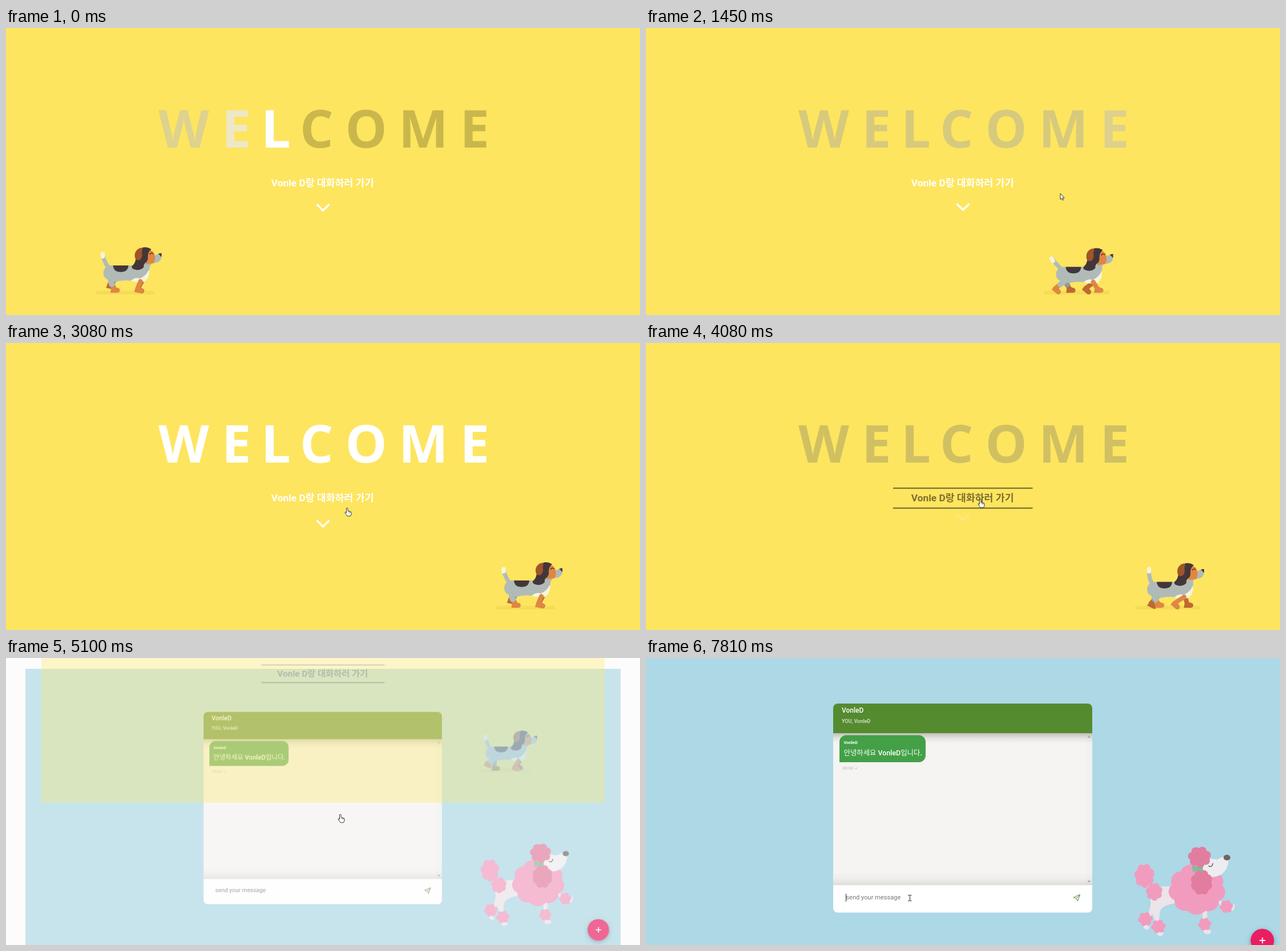
An HTML page with a canvas that plays this animation: 1111 px wide and 504 px high, repeating every 8000 ms.

```html
<!DOCTYPE html>
<html lang="ko">
<head>
<meta charset="utf-8">
<title>Welcome</title>
<style>
html, body { margin: 0; width: 100%; height: 100%; overflow: hidden; background: #fcfcfc; }
canvas { display: block; }
</style>
</head>
<body>
<canvas id="stage" width="1111" height="504"></canvas>
<script>
const LOOP = 8000, W = 1111, H = 504;
const PAD_X = 11, PAD_Y = 2, CX = 555.5, CY = 263.5;
const SANS = "Roboto, 'Noto Sans CJK KR', 'Noto Sans CJK', sans-serif";
const YELLOW = '#fde55f', DARK = [202, 183, 76], WHITE = [255, 255, 255];
const GREY = '#b0bbb8', INK = '#43363a', ORANGE = '#df8742', RUST = '#bd6a33', CREAM = '#f6f5dc';
const PINK = '#f19cbe', ROSE = '#e27d9f', FUR = '#ebe4e8';

const screen = document.getElementById('stage').getContext('2d');
const layer = () => {
  const c = document.createElement('canvas');
  c.width = W + 2 * PAD_X;
  c.height = 530;
  const k = c.getContext('2d');
  k.translate(PAD_X, PAD_Y);
  return k;
};
const front = layer(), back = layer();
let g = screen;

const clamp = (v, a = 0, b = 1) => Math.min(b, Math.max(a, v));
const ramp = (t, a, b) => clamp((t - a) / (b - a));
const mix = (a, b, k) => `rgb(${a.map((v, i) => Math.round(v + (b[i] - v) * k))})`;

// CSS "ease" curve
function ease(x) {
  if (x <= 0 || x >= 1) return clamp(x);
  const bez = (a, b, u) => 3 * a * u * (1 - u) ** 2 + 3 * b * u * u * (1 - u) + u ** 3;
  let lo = 0, hi = 1;
  for (let i = 0; i < 24; i++) {
    const m = (lo + hi) / 2;
    if (bez(0.25, 0.25, m) < x) lo = m; else hi = m;
  }
  return bez(0.1, 1, lo);
}

// linear track through [time, value...] keys
function track(keys, t) {
  let i = 1;
  while (i < keys.length - 1 && keys[i][0] < t) i++;
  const a = keys[i - 1], b = keys[i], k = ramp(t, a[0], b[0]);
  return a.slice(1).map((v, n) => v + (b[n + 1] - v) * k);
}

function shape(d, fill) {
  g.fillStyle = fill;
  g.fill(new Path2D(d));
}
function stroke(d, color, width) {
  g.strokeStyle = color;
  g.lineWidth = width;
  g.lineCap = g.lineJoin = 'round';
  g.stroke(new Path2D(d));
}
function oval(x, y, rx, ry, fill, turn = 0) {
  g.fillStyle = fill;
  g.beginPath();
  g.ellipse(x, y, rx, ry, turn, 0, 7);
  g.fill();
}
function box(x, y, w, h, r, fill) {
  g.fillStyle = fill;
  g.beginPath();
  g.roundRect(x, y, w, h, r);
  g.fill();
}
function label(s, x, y, size, weight, fill, align = 'left') {
  g.font = `${weight} ${size}px ${SANS}`;
  g.textAlign = align;
  g.fillStyle = fill;
  g.fillText(s, x, y);
}

/* ---------- welcome page ---------- */

const LETTERS = [['W', 311.5], ['E', 405.5], ['L', 475.5], ['C', 545.5], ['O', 631], ['M', 731.5], ['E', 823]];
const STEP = 240, CYCLE = 4800;

function glow(i, t) {
  const c = t > 4200 ? t - CYCLE : t;
  const age = c - (i - 2) * STEP;
  if (c > 3450) return 1 - ramp(c, 3450, 4170);
  const wave = age < 0 ? clamp(1 + age / STEP) : Math.max(0.27, 1 - age * 0.0013);
  return Math.max(wave, c > 1460 ? 0.27 + 0.73 * ramp(c, 1460, 2540) : 0);
}

function heading(t) {
  g.font = "660 92px 'Open Sans', 'Noto Sans', sans-serif";
  g.textAlign = 'left';
  LETTERS.forEach(([ch, x], i) => {
    const m = g.measureText(ch);
    const mid = (m.actualBoundingBoxRight - m.actualBoundingBoxLeft) / 2;
    g.fillStyle = mix(DARK, WHITE, glow(i, t));
    g.fillText(ch, x - mid, 209.5);
  });
}

function link(t) {
  const hover = ramp(t, 3260, 3560);
  g.fillStyle = `rgba(0,0,0,${0.5 * hover})`;
  g.fillRect(433, 253.8, 244.5, 2.3);
  g.fillRect(433, 288.8, 244.5, 2.3);
  label('Vonle D랑 대화하러 가기', 554.7, 278, 17.3, 700, mix(WHITE, [126, 110, 47], hover), 'center');

  const ph = (t + 750) % 1500 - 750;
  const y = 315 + (ph + 25) * 0.022;
  g.globalAlpha = clamp(1.4 - Math.abs(ph - 60) / 400);
  stroke(`M545.5 ${y - 5}L555.5 ${y + 5}L565.5 ${y - 5}`, '#fff', 3.4);
  g.globalAlpha = 1;
}

// a trailing foot tips onto its toe
function leg(hx, hy, fx, lift, color, upper) {
  const fy = 460 - lift, tip = 0.7 * clamp((hx - fx) / 12);
  const ax = fx - 2, ay = fy - 3;
  stroke(`M${hx} ${hy}L${ax} ${ay}`, color, 8);
  if (upper) stroke(`M${hx} ${hy}L${hx + (ax - hx) * 0.4} ${hy + (ay - hy) * 0.4}`, upper, 10);
  g.save();
  g.translate(fx, fy);
  g.rotate(tip);
  shape('M-7.500 5L-6 -4Q0 -6 4 -4Q9 -3.500 9 0.500Q9 5 4 5Z', color);
  g.restore();
}

// drawn with the nose at x = 272
function hound(t) {
  const x = 980 - 708 * Math.max(0, 1 - t / 3925) ** 3.23;
  const [turn] = track([[0, 0], [1450, 2.25], [3080, 5], [4080, 6.75], [8000, 13.6]], t);
  const s = Math.sin(turn * 2 * Math.PI), c = Math.cos(turn * 2 * Math.PI), drop = s * s;
  g.save();
  g.translate(x - 272, 0);
  box(156 - 7 * drop, 461.5, 103 + 12 * drop, 6.5, 3, '#f4dc59');

  leg(187, 446, 187 + 8 * s - 4 * c, Math.max(0, c) * 7, RUST, '#8f9b98');
  leg(237, 446, 233 - 9 * s, Math.max(0, -c) * 2, RUST);

  g.save();
  g.translate(0, 2.5 * drop);
  const tx = 169 - 4.5 * s, ty = 399 + 8 * Math.max(0, s) - 2.5 * drop;
  stroke(`M183 424Q173 416 ${tx} ${ty}`, GREY, 7);
  stroke(`M${tx} ${ty + 2}L${tx - 2.5 * Math.max(0, s)} ${ty - 2}`, CREAM, 7.5);
  shape('M184 417H226L250 411Q253 430 245 442Q238 448 228 445Q211 442 199 444Q189 447 180 443Q170 439 170 431Q170 418 184 417Z', GREY);
  shape('M218 444Q226 437 234 440Q247 434 250 423Q253 436 243 445Q232 448 218 444Z', CREAM);
  shape('M187 417H214Q213 428.500 200.500 428.500Q188 428.500 187 417Z', INK);
  g.restore();

  leg(183, 445 + drop, 181 - 10 * s + 9 * c, Math.max(0, -c) * 7, ORANGE, GREY);
  leg(235, 445 + drop, 232 + 12 * s, 0, ORANGE);

  g.translate(-2 * drop, 1.5 * drop);
  shape('M246 411L262 409L255 414Q251 417 250 426L238 424Z', GREY);
  shape('M258 400Q264 398 270 395L272 402Q271 409 265 411.500L252 414Z', GREY);
  shape('M248 389Q258 390 260 399Q262 407 258 413L244 415Z', ORANGE);
  shape('M231 390Q242 381 254 388.500Q248 393 248 401Q249 409 243 413Q240 416 241 420Q234 427 225 424Q219 423 220 418Q226 414 227 404Z', INK);
  shape('M227 392Q232 385 239 386Q237 393 238 400Q237 407 231 408Q225 407 225 400Q225 395 227 392Z', '#a05528');
  shape('M266 397Q268 395 272 395.500L272 402Q270 401 268 398Z', INK);
  stroke('M251.500 397.500Q254 393.500 257 396.500', '#6b2f1c', 1.5);
  g.restore();
}

function welcome(t) {
  g = front;
  g.clearRect(-PAD_X, -PAD_Y, W + 2 * PAD_X, 530);
  g.fillStyle = YELLOW;
  g.fillRect(-3, -PAD_Y, W + 6, 530);
  heading(t);
  link(t);
  hound(t);
}

/* ---------- chat page ---------- */

function fluff(x, y, rx, ry, n, color) {
  oval(x, y, rx * 0.75, ry * 0.75, color);
  for (let i = 0; i < n; i++) {
    const a = i / n * 2 * Math.PI - 1.2;
    oval(x + Math.cos(a) * rx * 0.63, y + Math.sin(a) * ry * 0.63, rx * 0.39, ry * 0.39, color);
  }
}

function poodle() {
  stroke('M889 408Q880 398 876 388', FUR, 5);
  shape('M884 409Q900 398 925 402L938 430Q910 431 902 442Q898 452 900 474L893 474Q892 458 887 450Q882 458 879 464L872 460Q886 444 884 425Z', FUR);
  stroke('M873 462L875 473', FUR, 6);
  oval(878, 473.5, 4, 3.5, FUR);
  oval(901, 484, 6, 4, FUR);
  stroke('M979 440L980 478', FUR, 8);
  oval(984, 481, 6.5, 4, FUR);
  stroke('M998 424L1018 437L1028 436', FUR, 6);
  oval(1028.5, 438, 3, 6, FUR, 0.3);
  fluff(873.5, 382.5, 17.5, 21, 7, PINK);
  fluff(890.5, 410.5, 14.5, 15.5, 7, PINK);
  fluff(875, 458.5, 12.5, 12.5, 6, PINK);
  fluff(898, 471.5, 12.5, 12, 6, PINK);
  fluff(979, 467.5, 11.5, 11.5, 6, PINK);
  fluff(1017, 436.5, 11.5, 11.5, 6, PINK);
  fluff(965.5, 406, 49, 44, 9, PINK);
  oval(965, 406, 38, 36, PINK);
  shape('M974 358Q986 350 1000 354L1017 347L1021 354Q1020 372 1008 380Q996 387 984 383Q975 378 973 368Z', '#eeecef');
  oval(1018, 350.5, 6, 5, '#71665e');
  stroke('M986 365Q991 369 993.500 361', '#71665e', 1.6);
  fluff(973.5, 394, 19, 22, 8, ROSE);
  shape('M957 364L966 367L976 364V375L966 373L958 376Z', '#7bbf95');
  fluff(970, 349.5, 20, 18.5, 7, ROSE);
}

function shade(y0, y1, alpha) {
  const f = g.createLinearGradient(0, y0, 0, y1);
  f.addColorStop(0, `rgba(60,50,45,${alpha})`);
  f.addColorStop(0.5, `rgba(60,50,45,${alpha * 0.3})`);
  f.addColorStop(1, 'rgba(60,50,45,0)');
  g.fillStyle = f;
  g.fillRect(328, Math.min(y0, y1), 454, Math.abs(y1 - y0));
}

function card(t) {
  box(328, 80, 454, 367, 8, '#f5f4f2');
  g.fillStyle = '#f1f1f1';
  g.fillRect(771, 132, 11, 267);
  shade(132, 150, 0.28);
  shade(399, 377, 0.12);
  shape('M774 140L776.500 136.500L779 140Z', '#a3a3a3');
  shape('M774 391L776.500 394.500L779 391Z', '#a3a3a3');
  box(328, 80, 454, 52, [8, 8, 0, 0], '#558b2f');
  label('VonleD', 343, 96, 12, 500, '#fff');
  label('YOU, VonleD', 343, 113.5, 9, 500, '#dde8d5');

  box(339, 135.5, 151, 47.5, [12, 12, 12, 0], '#43a047');
  label('VonleD', 346.5, 151, 7.6, 700, '#fff');
  label('안녕하세요 VonleD입니다.', 346.5, 170.5, 12.4, 500, '#fff');
  label('00:00', 344.5, 195.5, 7.5, 400, '#b9b8b6');
  stroke('M366.500 193.500L368 195L371 191.800', '#b9b8b6', 0.9);

  box(328, 399, 454, 48, [0, 0, 8, 8], '#fff');
  label('send your message', 350.3, 424, 11.1, 400, '#787878');
  stroke('M760.500 415.500L749 420.500L754 422.500L756.500 426.500ZM760.500 415.500L754 422.500', '#6f9c55', 1.1);
  if (t >= 6710 && (t < 7260 || t >= 7810)) {
    g.fillStyle = '#333';
    g.fillRect(350, 414, 1, 14);
  }
}

function chat(t) {
  g = back;
  g.fillStyle = '#add8e6';
  g.fillRect(-PAD_X, -PAD_Y, W + 2 * PAD_X, 530);
  card(t);
  poodle();
  g.save();
  g.shadowColor = 'rgba(0,0,0,.3)';
  g.shadowBlur = 8;
  g.shadowOffsetY = 3;
  oval(1080, 496, 20.5, 20.5, '#e91e63');
  g.restore();
  g.fillStyle = '#fff';
  g.fillRect(1075, 495.1, 10.5, 1.8);
  g.fillRect(1079.4, 490.8, 1.8, 10.5);
}

/* ---------- pointer ---------- */

const PATH = [[760, 752, 14], [850, 745, 101], [1150, 730, 250], [1450, 726, 291], [2000, 722, 297],
  [2700, 640, 306], [3080, 598, 290], [3400, 586, 275], [5830, 586, 275], [5950, 543, 325],
  [6250, 485, 395], [6470, 462, 421]];

function pointer(t) {
  if (t < 760) return;
  const [x, y] = track(PATH, t).map(Math.round);
  g.save();
  g.translate(x, y);
  if (t > 6270) {
    stroke('M-2.500 -4.500H-.5L0.500 -4L1.500 -4.500H3M.5 -4V5M-2.500 5.500H-.5L.5 5L1.500 5.500H3', '#222', 1);
  } else if (t > 2900 && t < 5850) {
    const d = 'M-1.500 8V1Q-1.500 -.5 -.3 -.5Q1 -.5 1 1V5L4.500 5.500Q7 6 7 8V10Q7 12 5.500 14H0Q-1 12 -3.500 9Q-4.500 7 -3 6.800Z';
    shape(d, '#fff');
    stroke(d, '#222', 0.9);
    stroke('M3 6V8M5 6.500V8', '#222', 0.7);
  } else {
    const d = 'M0 0V10L2.300 8L4 11.500L5.500 10.800L4 7.300H6.800Z';
    shape(d, '#fff');
    stroke(d, '#222', 0.9);
  }
  g.restore();
}

function place(src, scale, dy, alpha) {
  screen.save();
  screen.globalAlpha = alpha;
  screen.translate(CX, CY + dy);
  screen.scale(scale, scale);
  screen.drawImage(src.canvas, -CX - PAD_X, -CY - PAD_Y);
  screen.restore();
}

function draw(t) {
  const p = ease((t - 4650) / 1150);
  screen.fillStyle = '#fcfcfc';
  screen.fillRect(0, 0, W, H);
  if (p > 0) {
    chat(t);
    place(back, 1 - 0.244 * (1 - p), 0, p);
  }
  if (p < 1) {
    welcome(t);
    place(front, 1 - 0.173 * p, -363 * p, 1 - p);
  }
  g = screen;
  pointer(t);
}

const start = performance.now();
function tick() {
  draw((performance.now() - start) % LOOP);
  requestAnimationFrame(tick);
}
tick();
</script>
</body>
</html>
```
